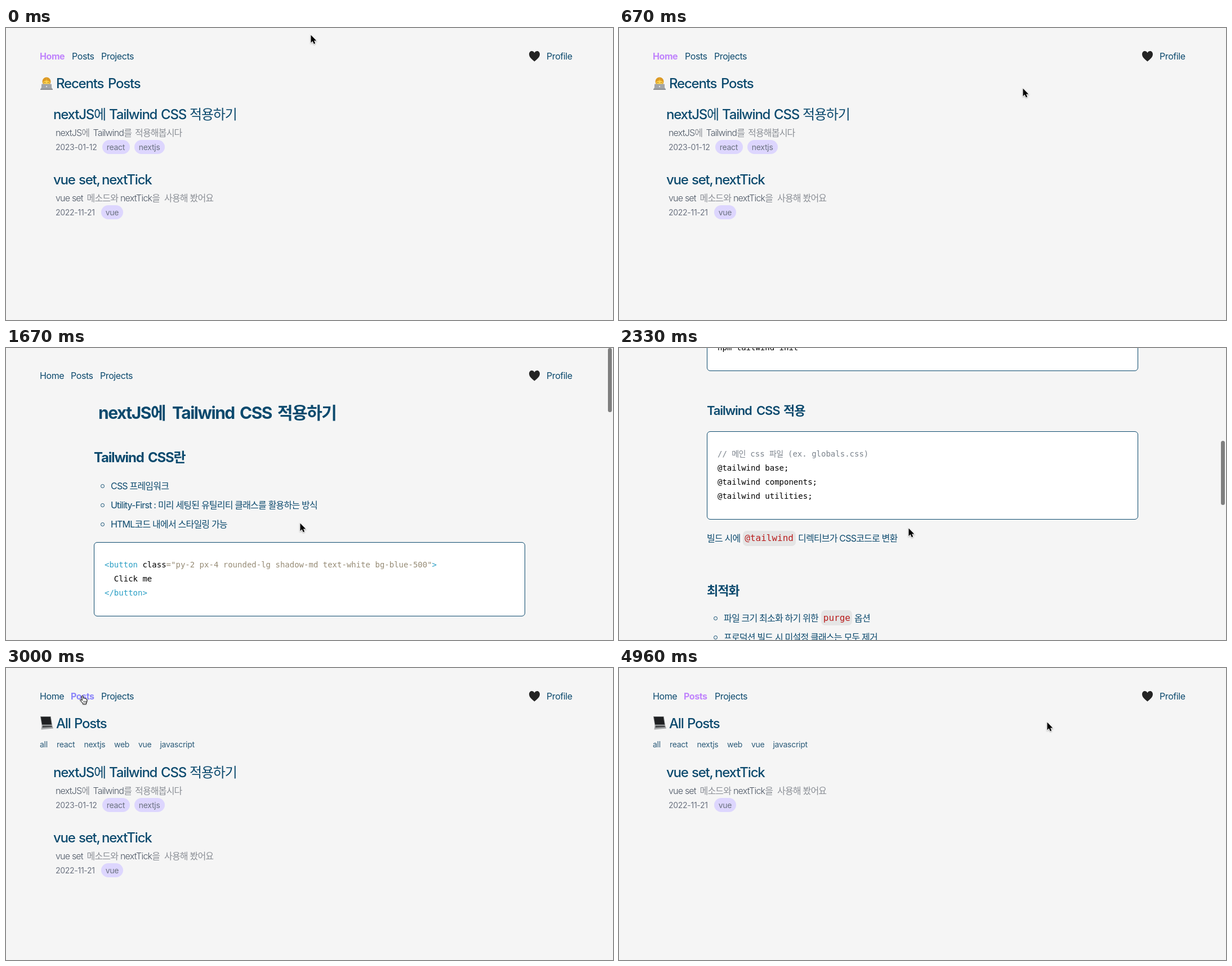
An HTML page for the animation above (5580 ms loop, 1078 px wide and 519 px high).

```html
<!DOCTYPE html>
<html lang="ko">
<head>
<meta charset="utf-8">
<style>
html, body { margin: 0; width: 100%; height: 100%; overflow: hidden; }
#stage {
  --ink: #0c4a6e; --link: #0c4a6e; --title: #0c4a6e; --desc: #4b5563; --soft: #8b8f96;
  --date: #6b7280; --pill: #ddd6fe; --tag: #6b7280; --heart: #242424;
  position: relative; width: 1078px; height: 519px; overflow: hidden;
  background: #f5f5f5; font: 16px Inter, "Noto Sans CJK KR", "Noto Sans CJK", sans-serif;
}
#stage.dark {
  --ink: #e2e8f0; --link: #316988; --title: #cbd5e1; --desc: #e5e7eb; --soft: #a3abb8;
  --date: #fff; --pill: #c4b5fd; --tag: #1e293b; --heart: #e8e8e8;
  background: #1e293b; box-shadow: inset 1px 0 #374151, inset -1px 0 #374151;
}
#stage * { position: absolute; }
#stage span { white-space: pre; line-height: 0; letter-spacing: -.05em; color: var(--ink); }
#stage span *, #stage svg * { position: static; }
i { font-style: normal; }
#stage .nav { letter-spacing: -.026em; }
#stage .link { color: var(--link); }
#stage .on { font-weight: 700; color: #c084fc; }
#stage .turning { font-weight: 650; color: #8b85fa; }
#stage .title { font-size: 24px; font-weight: 500; color: var(--title); }
#stage .desc { font-weight: 300; color: var(--desc); }
.desc i { color: var(--soft); }
#stage .date, #stage .tag, #stage .filter { font-size: 14px; letter-spacing: -.02em; color: var(--date); }
#stage .tag { color: var(--tag); }
#stage .filter { color: #2b5b79; }
#stage .h1 { font-size: 30px; font-weight: 700; }
#stage .h2 { font-size: 24px; font-weight: 700; }
#stage .h3 { font-size: 22px; font-weight: 600; }
#stage .code, #stage .inline {
  font: 14px/0 "DejaVu Sans Mono", "Noto Sans CJK KR", "Noto Sans CJK", monospace;
  letter-spacing: 0; color: #000;
}
#stage .inline { font-size: 16px; color: #b91c1c; }
.code i { letter-spacing: -.043em; }
.code u { text-decoration: none; color: #2b9fc5; }
.code s { text-decoration: none; color: #968b75; }
.code em { font-style: normal; color: #7b838c; }
.pill { border-radius: 13px; background: var(--pill); }
.chip { border-radius: 7px; background: #e5e5e5; }
.block { box-sizing: border-box; border: 1px solid #0c4a6e; border-radius: 6px; background: #fff; }
.dot { box-sizing: border-box; border: 1px solid #0c4a6e; border-radius: 50%; }
.thumb { border-radius: 4px; background: #7f7f7f; }
.lift { border-radius: 8px; box-shadow: 0 3px 10px #0001; }
svg { overflow: visible; width: 1px; height: 1px; }
.cursor { filter: drop-shadow(0 1px 1px #0005); }
</style>
</head>
<body>
<div id="stage"></div>
<script>
const stage = document.getElementById('stage');

const text = (x, y, s, c = '') =>
  `<span class="${c}" style="left:${x}px;top:${y}px">${s.replace(/[가-힣]+/g, '<i>$&</i>')}</span>`;
const words = (y, c, list) => list.map(([x, s]) => text(x, y, s, c)).join('');
const box = (x, y, w, h, c) =>
  `<div class="${c}" style="left:${x}px;top:${y}px;width:${w}px;height:${h}px"></div>`;
const svg = (x, y, body, c = '') => `<svg class="${c}" style="left:${x}px;top:${y}px">${body}</svg>`;

const arrow = (x, y) => svg(x, y,
  `<path d="M.5 .5V14.2L3.6 11.3 5.8 16.2 8.2 15.2 6 10.4H10.3Z" stroke="#fff" stroke-width="1.6" paint-order="stroke"/>`, 'cursor');
const hand = (x, y) => svg(x, y,
  `<path d="M3.4 2Q4.8 .2 5.8 2L6.4 6Q8 4.8 8.8 6.3 10.2 5.4 11 7 13 6.6 13 9 13 12 11.5 14V16H5.5V14.5Q3 12 .6 9 1 7.3 3 8.6L4.4 9.8Z" fill="#fff" stroke="#000"/>
   <path d="M7 10.5V13.5M9 10.5V13.5M11 10.5V13.5" stroke="#000" stroke-width=".8"/>`, 'cursor');

const coder = svg(61, 87,
  `<path d="M1 22Q2 13 11 13T21 22Z" fill="#7d8ea0"/>
   <circle cx="11" cy="8" r="7.5" fill="#dc9a25"/><ellipse cx="11" cy="9.5" rx="5.5" ry="6" fill="#ffd04a"/>
   <path d="M4.5 8Q7 2 11 4.5 15 2 17.5 8 14 7.5 11 5.8 8 7.5 4.5 8Z" fill="#dc9a25"/>
   <path d="M8 9V10.5M14 9V10.5" stroke="#5b3d16"/>
   <rect x="2" y="12.5" width="18" height="9.5" rx="1" fill="#a2a5a8"/><path d="M0 22H22" stroke="#7d8084" stroke-width="1.6"/>
   <circle cx="11" cy="17" r="1.2" fill="#e4e5e6"/>`);
const laptop = svg(60, 86,
  `<path d="M1 0H19.5L22 15.5H3.5Z" fill="#77797b"/><path d="M2 1H18.7L20.8 14.5H4.3Z" fill="#1f2022"/>
   <path d="M3.5 15.5H22L24 21.5 2.5 23.5Z" fill="#a5a7a9"/><path d="M5 16.5H21L22 19 4.6 20Z" fill="#47494b"/>`);
const heart = svg(929, 41,
  `<path d="M9.5 18.5C6 15.5 0 11.5 0 5.8 0 -.8 7.2 -1.7 9.5 3.2 11.8 -1.7 19 -.8 19 5.8 19 11.5 13 15.5 9.5 18.5Z" fill="var(--heart)"/>`);

// Navigation: x of the second and third link, index and style of the current one
function nav(x2, x3, current = -1, style = 'on') {
  const links = [[60, 'Home'], [x2, 'Posts'], [x3, 'Projects']]
    .map(([x, s], i) => text(x, 50, s, 'nav ' + (i == current ? style : 'link')));
  return links.join('') + heart + text(960, 50, 'Profile', 'nav');
}

const tailwind = {
  title: [[84, 'nextJS에'], [183, 'Tailwind'], [275, 'CSS'], [326, '적용하기']],
  desc: [[88, 'nextJS에'], [154.5, 'Tailwind를'], [229, '적용해봅시다']],
  date: '2023-01-12',
  tags: [[171, 49, 'react'], [228, 53.5, 'nextjs']]
};
const vue = {
  title: [[84, 'vue'], [129, 'set,'], [170, 'nextTick']],
  desc: [[88, 'vue set'], [143.5, '메소드와'], [203, 'nextTick을'], [281, '사용해 봤어요']],
  date: '2022-11-21',
  tags: [[169, 39, 'vue']]
};

const post = (p, y) => words(y, 'title', p.title) + words(y + 32, 'desc', p.desc) +
  text(88, y + 57.5, p.date, 'date') +
  p.tags.map(([x, w, s]) => box(x, y + 44.5, w, 25, 'pill') + text(x + 7.7, y + 57.5, s, 'tag')).join('');
const posts = (list, y) => list.map((p, i) => post(p, y + 116 * i)).join('');

const home = (lifted = '') => nav(117, 169, 0) + coder +
  words(98.5, 'title', [[89, 'Recents'], [181, 'Posts']]) + lifted + posts([tailwind, vue], 154);

const filters = [[60, 'all'], [90, 'react'], [138.5, 'nextjs'], [192, 'web'], [235, 'vue'], [273.5, 'javascript']];
const allPosts = (list, turning) => nav(115, turning ? 169 : 170, 1, turning ? 'turning' : 'on') + laptop +
  words(98.5, 'title', [[89, 'All'], [121, 'Posts']]) + words(136, 'filter', filters) + posts(list, 186);

const block = (y, lines) => box(156, y, 766, 57 + 25 * lines.length, 'block') +
  lines.map((s, i) => text(175, y + 40 + 25 * i, s, 'code')).join('');
const item = (y, s) => box(168, y - 3, 7, 7, 'dot') + text(186, y, s);
const chip = (x, y, w, s) => box(x, y - 13.5, w, 27, 'chip') + text(x + 3.8, y, s, 'inline');

function article(scroll) {
  const page = `<div style="top:-1px">${nav(115, 167)}</div>` +
    words(115, 'h1', [[164, 'nextJS에'], [295, 'Tailwind'], [415, 'CSS'], [482, '적용하기']]) +
    words(195, 'h2', [[156, 'Tailwind'], [252, 'CSS란']]) +
    item(245, 'CSS 프레임워크') +
    item(279, 'Utility-First : 미리 세팅된 유틸리티 클래스를 활용하는 방식') +
    item(313, 'HTML코드 내에서 스타일링 가능') +
    block(345, [
      '<u>&lt;button</u> class<s>="py-2 px-4 rounded-lg shadow-md text-white bg-blue-500"</s><u>&gt;</u>',
      '  Click me',
      '<u>&lt;/button&gt;</u>'
    ]) +
    words(547, 'h3', [[156, 'Tailwind'], [244, 'CSS'], [292, '설치']]) +
    block(585, [
      '<em># 패키지 설치</em>', 'npm install -D tailwindcss', 'npm install -D postcss autoprefixer',
      '', '<em># 설정 파일 생성</em>', 'npm tailwind init'
    ]) +
    words(862, 'h3', [[156, 'Tailwind'], [244, 'CSS'], [292, '적용']]) +
    block(899, [
      '<em>// 메인 css 파일 (ex. globals.css)</em>',
      '@tailwind base;', '@tailwind components;', '@tailwind utilities;'
    ]) +
    text(156, 1089, '빌드 시에') + chip(219.5, 1089, 94, '@tailwind') +
    text(318, 1089, '디렉티브가 CSS코드로 변환') +
    text(156, 1182, '최적화', 'h3') +
    item(1230.5, '파일 크기 최소화 하기 위한') + chip(359, 1230.5, 55, 'purge') + text(418, 1230.5, '옵션') +
    item(1265, '프로덕션 빌드 시 미설정 클래스는 모두 제거');
  return `<div style="top:${-scroll}px">${page}</div>` + box(1069, scroll * .2195, 7, 114, 'thumb');
}

const both = [tailwind, vue];
const steps = [
  [0, () => home() + arrow(541, 12)],
  [330, () => home() + hand(931, 52), 'dark'],
  [670, () => home() + arrow(717, 107)],
  [1000, () => home() + hand(600, 268)],
  [1330, () => home(box(60, 118, 958, 118, 'lift')) + hand(530, 180)],
  [1670, () => article(0) + arrow(522, 311)],
  [2000, () => article(361) + arrow(520, 315)],
  [2330, () => article(751) + arrow(514, 320)],
  [2670, () => article(0) + arrow(420, 200)],
  [3000, () => allPosts(both, true) + hand(131, 48)],
  [3330, () => allPosts(both) + hand(221, 232)],
  [3670, () => allPosts(both) + hand(65, 130)],
  [4000, () => allPosts([tailwind]) + hand(145, 130)],
  [4330, () => allPosts([tailwind]) + arrow(248, 166)],
  [4960, () => allPosts([vue]) + arrow(760, 96)]
];

let shown;
function frame(now) {
  const step = steps.findLast(([start]) => start <= now % 5580);
  if (step !== shown) {
    shown = step;
    stage.className = step[2] || '';
    stage.innerHTML = step[1]();
  }
  requestAnimationFrame(frame);
}
frame(performance.now());
</script>
</body>
</html>
```
